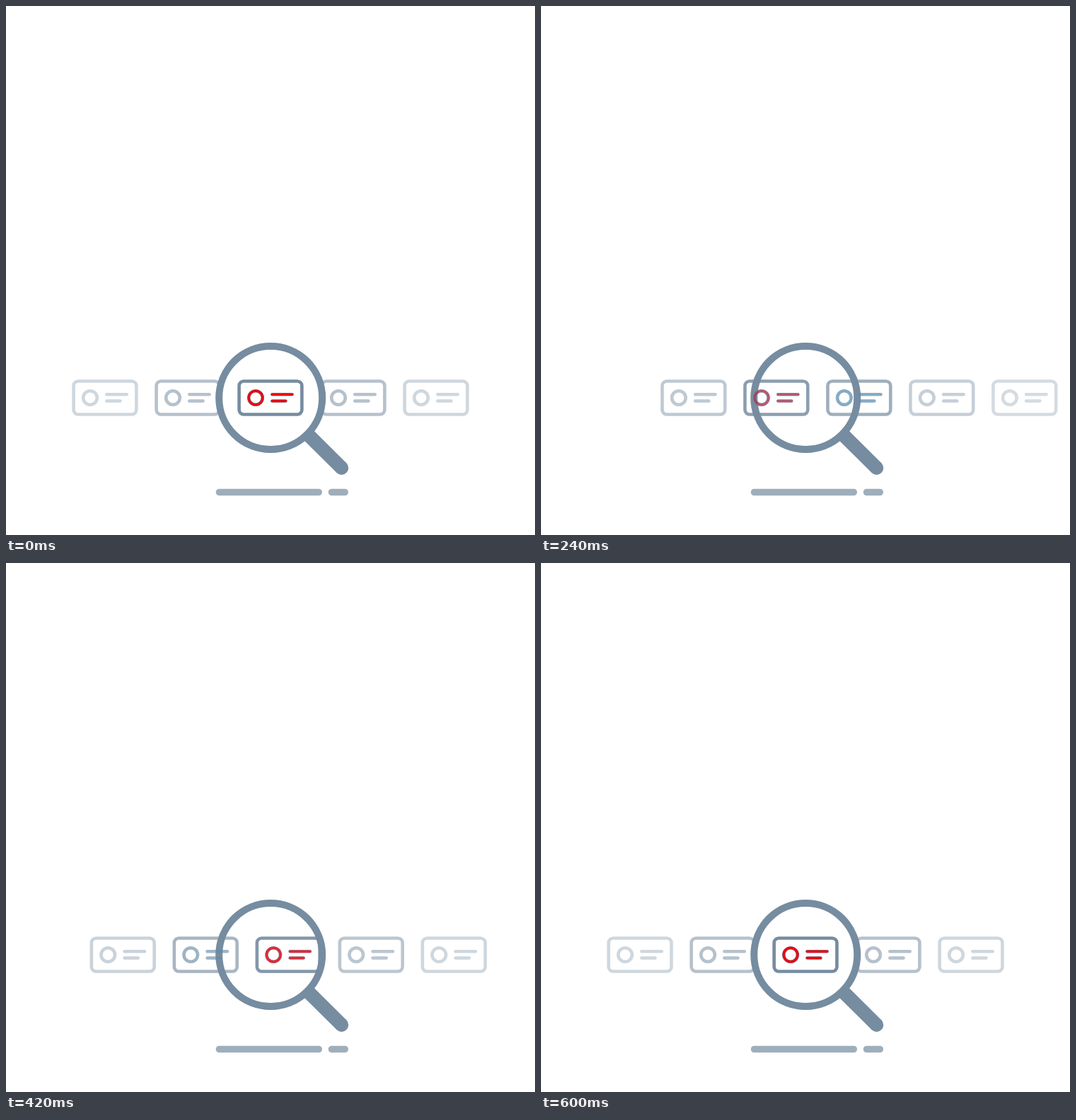
Write an HTML page that moves like this. It is 748 by 748 pixels and loops after 1.2 s.

```html
<!DOCTYPE html>
<html lang="en">
<head>
<meta charset="utf-8">
<title>Searching cards</title>
<style>
  html, body { margin: 0; height: 100%; overflow: hidden; background: #fff; }
  svg { display: block; width: 100vw; height: 100vh; }
</style>
</head>
<body>
<svg viewBox="0 0 748 748" fill="none" stroke="#768ca0" stroke-linecap="round">
  <defs>
    <g id="info">
      <circle cx="-21" r="9.8"/>
      <path d="M2.3-4.7H30.7M2.3 4.5H21.5"/>
    </g>
    <rect id="frame" x="-44.4" y="-23.5" width="88.8" height="47" rx="6.5" stroke-width="4.6"/>
  </defs>
  <circle cx="374.2" cy="554" r="73" stroke-width="10"/>
  <path d="M427 606.5L428 607.5" stroke-width="10"/>
  <path d="M428 607L474.5 653.2" stroke-width="19.4"  stroke-linecap="butt"/>
  <circle cx="474.5" cy="653.2" r="9.7" fill="#768ca0" stroke="none"/>
  <path d="M301.5 687.5H442.2M460.5 687.5H479.2" stroke="#9eaebb" stroke-width="9.6"/>
  <g id="cards"></g>
</svg>
<script>
const GRAY = [118, 140, 160], BLUE = [59, 133, 181], RED = [235, 8, 18];
const LOOP = 1200, MOVE = 600, STEP = 30, PITCH = 117;
const LEVELS = [1, 0.53, 0.34, 0];

const ramp = (t, a, b) => Math.min(1, Math.max(0, (t - a) / (b - a)));
const mix = (a, b, k) => a + (b - a) * k;
const blend = (a, b, k) => a.map((v, i) => mix(v, b[i], k));
const ease = k => k * k * (3 - 2 * k);

// Slots -2..2 are visible at rest; slot 3 enters from the right.
const cards = [-2, -1, 0, 1, 2, 3].map(slot => {
  const node = document.createElementNS("http://www.w3.org/2000/svg", "g");
  node.innerHTML = '<use href="#frame"/><use href="#info" stroke-width="4.6"/>' +
    '<use href="#info" stroke-width="3.4"/>';
  document.getElementById("cards").append(node);
  return { slot, node, tint: node.lastChild };
});

function opacity(slot, t, e) {
  if (slot === -2) return LEVELS[2] * (1 - ramp(t, 0, 90));
  if (slot === 3) return LEVELS[2] * ramp(t, 150, 250);
  return mix(LEVELS[Math.abs(slot)], LEVELS[Math.abs(slot - 1)], e);
}

function color(slot, t) {
  if (slot === 0) return blend(blend(RED, BLUE, ramp(t, 200, 300)), GRAY, ramp(t, 300, 480));
  if (slot === 1) return blend(blend(GRAY, BLUE, ramp(t, 120, 300)), RED, ramp(t, 300, 430));
  return GRAY;
}

function draw(now) {
  let t = Math.floor(now % LOOP / STEP) * STEP;
  if (t >= MOVE) t = 0;
  const e = ease(t / MOVE);
  for (const { slot, node, tint } of cards) {
    node.setAttribute("transform", `translate(${374 + (slot - e) * PITCH} 554)`);
    node.setAttribute("opacity", opacity(slot, t, e));
    tint.setAttribute("stroke", `rgb(${color(slot, t).map(Math.round)})`);
  }
}

let start;
function tick(now) {
  start ??= now;
  draw(now - start);
  requestAnimationFrame(tick);
}
draw(0);
requestAnimationFrame(tick);
</script>
</body>
</html>
```
